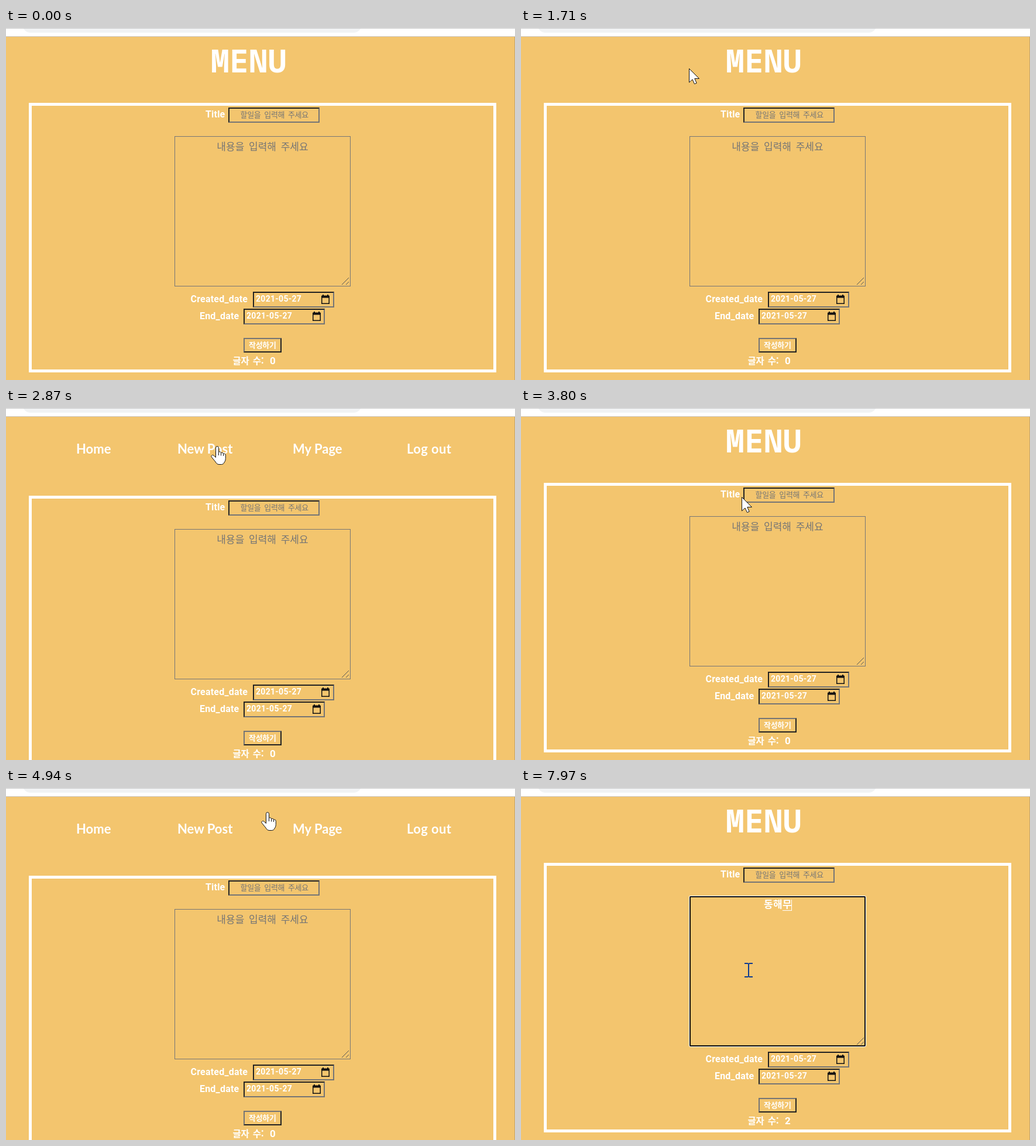
Animation of 870x602 px, one loop 8 s. Source, as an HTML page:

```html
<!DOCTYPE html>
<html lang="ko">
<head>
<meta charset="utf-8">
<title>New post form</title>
<style>
@property --shape { syntax: "<number>"; inherits: true; initial-value: 0; }
@property --open { syntax: "<number>"; inherits: true; initial-value: 0; }
@property --focus { syntax: "<number>"; inherits: true; initial-value: 0; }
@property --caret { syntax: "<number>"; inherits: true; initial-value: 0; }
@property --key { syntax: "<number>"; inherits: true; initial-value: 0; }
@property --count { syntax: "<number>"; inherits: true; initial-value: 0; }

html, body { margin: 0; width: 100%; height: 100%; overflow: hidden; }
#stage {
  position: relative; width: 870px; height: 602px; overflow: hidden; background: #f3c56e;
  animation: state 8s step-end -4ms infinite;
}
#form { position: absolute; inset: 0; transform: translateY(calc(var(--open) * 22px)); }
svg { position: absolute; left: 0; top: 0; overflow: visible; }

/* browser edge */
#bar { position: absolute; left: 0; top: 0; width: 870px; height: 14px; background: #fff; border-bottom: 1px solid #c9c9c9; overflow: hidden; }
#bar::before { content: ""; position: absolute; left: 28px; top: -20px; width: 580px; height: 28px; border-radius: 14px; background: #f1f3f4; }
#bar::after { content: ""; position: absolute; left: 0; top: 0; width: 870px; height: 1px; background: #c9c9c9; }
#edge { position: absolute; right: 0; top: 15px; width: 1px; height: 587px; background: #c3a36a; }

/* form boxes */
#form div { position: absolute; box-sizing: border-box; }
.frame { left: 39px; top: 128px; width: 799px; height: 461px; border: 5px solid #fff; }
.inset { border: 2px solid; border-color: #222 #757575 #757575 #222; }
.button { border: 2px solid; border-color: #757575 #222 #222 #757575; }
.area { left: 288px; top: 185px; width: 301px; height: 257px; border: 1px solid #767676; }
.ring { border: 2px solid #101010; border-radius: 2px; box-shadow: 0 0 0 1px #fff; opacity: var(--focus); }

/* type */
text { fill: #fff; font: 700 16px Roboto, sans-serif; white-space: pre; }
.menu { font: 700 53px "Noto Sans Mono", monospace; letter-spacing: .8px; }
.link text { font: 700 22px Lato, sans-serif; }
.label { letter-spacing: .2px; }
.date { font-size: 14px; letter-spacing: .3px; }
.ko { font: 700 13px "Noto Sans CJK KR", "Noto Sans CJK JP", sans-serif; letter-spacing: -.3px; word-spacing: 2.4px; }
.hint { fill: #757575; font-weight: 500; }
.big { font-size: 17px; letter-spacing: 0; word-spacing: 3px; }
.typed text { text-anchor: middle; letter-spacing: .3px; }

/* an element of a set shows while its index equals the state value */
.pick { opacity: calc(1 - max(var(--v) - var(--i), var(--i) - var(--v))); }
.nav { --v: var(--open); }
.typed { --v: var(--key); }
.counter { --v: var(--count); }
.cursor { --v: var(--shape); animation: move 8s step-end -4ms infinite; }
.caret { opacity: var(--caret); }

/* shape: 1 arrow, 2 text beam, 3 hand */
@keyframes state {
  0% { --shape: 0; --open: 0; --focus: 0; --caret: 0; --key: 0; --count: 0; }
  3.25% { --shape: 1; }
  4.93% { --shape: 2; }
  12.62% { --shape: 1; }
  23.125% { --shape: 3; --open: 1; }
  25.8% { --open: 0; }
  35.875% { --open: 1; }
  47.5% { --shape: 1; --open: 0; }
  49.25% { --shape: 2; }
  53.34% { --shape: 1; }
  56.77% { --shape: 3; --open: 1; }
  57.625% { --open: 0; }
  61.75% { --open: 1; }
  69.47% { --shape: 1; --open: 0; }
  71.16% { --shape: 2; }
  76.125% { --focus: 1; --caret: 1; }
  82.75% { --caret: 0; }
  88.5% { --key: 1; }
  90.125% { --count: 1; }
  93.5% { --key: 2; }
  95.125% { --key: 3; }
  96.875% { --key: 4; }
  97.75% { --key: 5; }
  98.75% { --key: 6; --count: 2; }
  99.625% { --key: 7; }
  100% { --shape: 2; --open: 0; --focus: 1; --caret: 0; --key: 7; --count: 2; }
}
@keyframes move {
  0% { transform: translate(726px, 580px); }
  3.25% { transform: translate(726px, 580px); animation-timing-function: steps(4); }
  6.625% { transform: translate(433px, 272px); }
  9.125% { transform: translate(433px, 272px); animation-timing-function: steps(5); }
  13.5% { transform: translate(196px, 190px); animation-timing-function: steps(4); }
  17% { transform: translate(133px, 86px); animation-timing-function: steps(3); }
  19.625% { transform: translate(122px, 72px); animation-timing-function: steps(2); }
  21.375% { transform: translate(287px, 69px); animation-timing-function: steps(2); }
  23.125% { transform: translate(385px, 62px); animation-timing-function: steps(4); }
  26.75% { transform: translate(361px, 65px); }
  47.5% { transform: translate(377px, 152px); animation-timing-function: steps(2); }
  49.25% { transform: translate(385px, 215px); }
  51.625% { transform: translate(385px, 215px); animation-timing-function: steps(7); }
  57.625% { transform: translate(445px, 55px); }
  61.75% { transform: translate(447px, 41px); }
  62.625% { transform: translate(447px, 30px); }
  68.625% { transform: translate(447px, 27px); animation-timing-function: steps(4); }
  72%, 100% { transform: translate(389px, 311px); }
}
</style>
</head>
<body>
<div id="stage">
  <div id="bar"></div>
  <div id="edge"></div>

  <svg class="nav" width="870" height="602">
    <text class="menu pick" style="--i:0" x="350" y="76">MENU</text>
    <g class="link pick" style="--i:1">
      <text x="120" y="78">Home</text>
      <text x="293" y="78">New Post</text>
      <text x="490" y="78">My Page</text>
      <text x="685" y="78" letter-spacing=".4">Log out</text>
    </g>
  </svg>

  <div id="form">
    <div class="frame"></div>
    <div class="inset" style="left:380px;top:136px;width:156px;height:26px"></div>
    <div class="area"></div>
    <div class="area ring"></div>
    <div class="inset" style="left:422px;top:451px;width:139px;height:27px"></div>
    <div class="inset" style="left:406px;top:480px;width:139px;height:27px"></div>
    <div class="button" style="left:406px;top:530px;width:65px;height:25px"></div>

    <svg width="870" height="602">
      <defs>
        <g id="calendar">
          <path d="M.75 3V15.25H13.25V3" fill="none" stroke="#111" stroke-width="1.5"/>
          <path d="M0 2.5Q0 1.5 1 1.5H2V0H4V1.5H10V0H12V1.5H13Q14 1.5 14 2.5V5.5H0Z" fill="#111"/>
        </g>
      </defs>
      <text class="label" x="341" y="153">Title</text>
      <text class="ko hint" x="400.5" y="153">할일을 입력해 주세요</text>
      <path d="M574 439L586 427M581 439L586 434" stroke="#555" fill="none"/>

      <text class="label" x="315.5" y="469">Created_date</text>
      <text class="date" x="427" y="468">2021-05-27</text>
      <use href="#calendar" x="539" y="456"/>
      <text class="label" x="331" y="498">End_date</text>
      <text class="date" x="411" y="497">2021-05-27</text>
      <use href="#calendar" x="524" y="485"/>

      <text class="ko" x="415" y="547">작성하기</text>
      <text class="ko" style="font-size:15.5px" x="387.5" y="574.5">글자 수:</text>
      <g class="counter">
        <text class="pick" style="--i:0;font-size:17px" x="451" y="575">0</text>
        <text class="pick" style="--i:1;font-size:17px" x="451" y="575">1</text>
        <text class="pick" style="--i:2;font-size:17px" x="451" y="575">2</text>
      </g>

      <g class="typed" fill="#fff">
        <text class="ko big hint pick" style="--i:0;letter-spacing:0" x="438.5" y="209">내용을 입력해 주세요</text>
        <g class="pick" style="--i:1"><text class="ko big" x="439" y="205">ㄷ</text><path d="M431 209h16v1h-16zM446 191h1v19h-1z"/></g>
        <g class="pick" style="--i:2"><text class="ko big" x="439" y="205">도</text><path d="M431 209h16v1h-16zM446 191h1v19h-1z"/></g>
        <g class="pick" style="--i:3"><text class="ko big" x="439" y="205">동</text><path d="M431 209h16v1h-16zM446 191h1v19h-1z"/></g>
        <g class="pick" style="--i:4"><text class="ko big" x="439" y="205">동ㅎ</text><path d="M439 209h16v1h-16zM454 191h1v19h-1z"/></g>
        <g class="pick" style="--i:5"><text class="ko big" x="439" y="205">동해</text><path d="M439 209h16v1h-16zM454 191h1v19h-1z"/></g>
        <g class="pick" style="--i:6"><text class="ko big" x="439" y="205">동해ㅁ</text><path d="M447 209h16v1h-16zM462 191h1v19h-1z"/></g>
        <g class="pick" style="--i:7"><text class="ko big" x="439" y="205">동해무</text><path d="M447 209h16v1h-16zM462 191h1v19h-1z"/></g>
      </g>
      <path class="caret" d="M439 191h1v20h-1z" fill="#fff"/>
    </svg>
  </div>

  <svg width="870" height="602">
    <g class="cursor" stroke-linejoin="round">
      <path class="pick" style="--i:1" d="M.5 .5V24L6 19L9.5 26.7L13.2 25.2L9.8 17.5H17.5Z" fill="#fff" stroke="#111"/>
      <path class="pick" style="--i:2" d="M-7 -11H-1.5L0 -10L1.5 -11H7M-7 12H-1.5L0 11L1.5 12H7M0 -10V11" fill="none" stroke="#0c3a91" stroke-width="2"/>
      <g class="pick" style="--i:3" transform="translate(-11)" stroke="#111" fill="#fff">
        <path d="M8.5 3.2Q8.5 .6 11 .6T13.5 3.2V10.5C14.5 9.3 17.5 9.5 17.5 12C18.5 10.8 21.5 11.2 21.5 13.5C22.5 12.5 25.3 13 25.3 15.5V21.5C25.3 26 23 27.5 22.3 29.3Q21.2 31.5 18.5 31.5H14C11 31.5 9.5 29.5 8 27L1.3 18.8C-.2 16.5 2.8 14.3 5 16.3L8.5 19.5Z"/>
        <path d="M13.5 10.5V16M17.5 12V16.5M21.5 13.5V17" fill="none"/>
      </g>
    </g>
  </svg>
</div>
</body>
</html>
```
